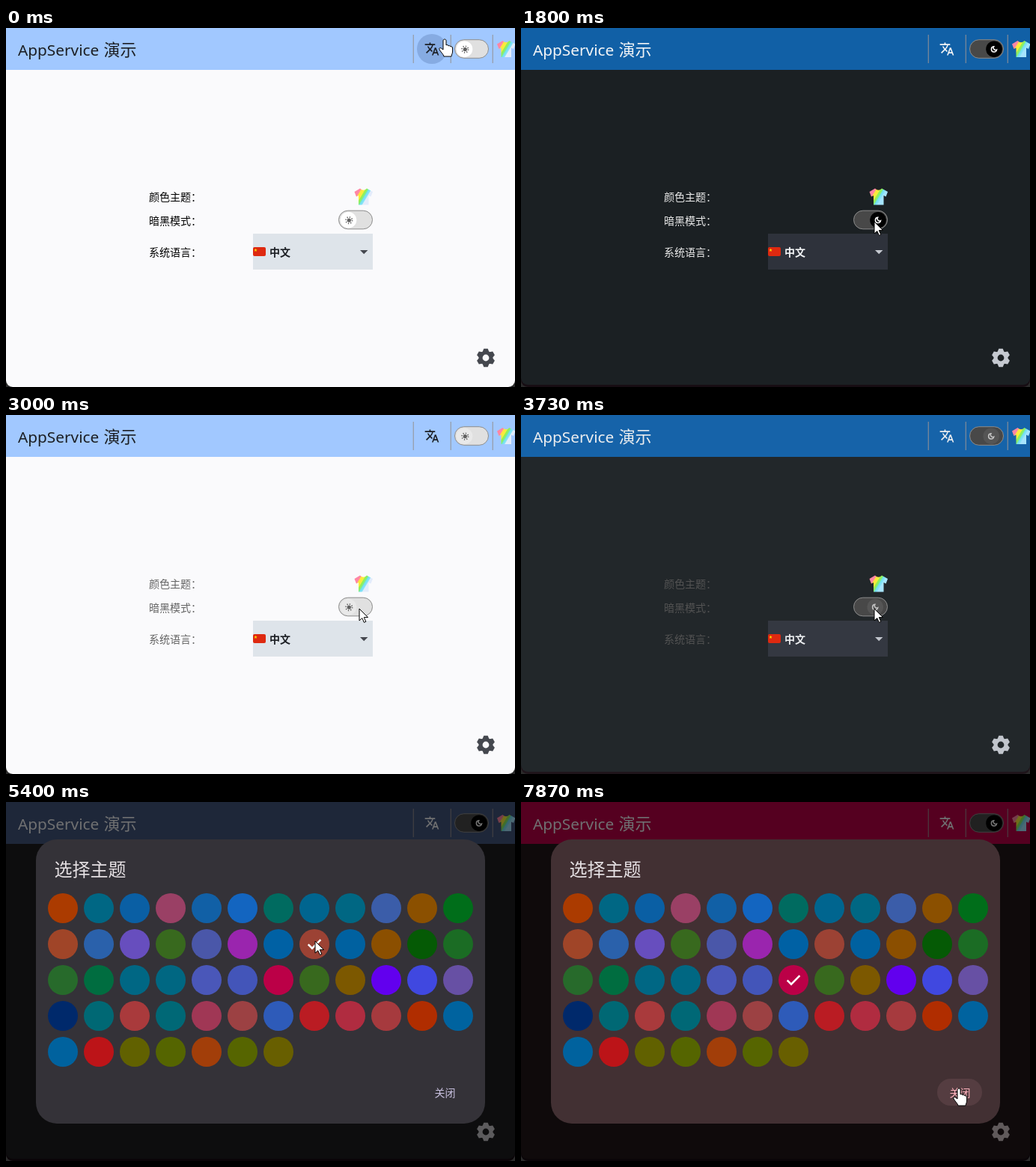
Recreate the animation shown at these times as an HTML page. Size 680 by 480 pixels, loop 8 s.

```html
<!DOCTYPE html>
<html lang="zh-CN">
<head>
<meta charset="utf-8">
<title>主题切换</title>
<style>
html, body { margin: 0; width: 100%; height: 100%; overflow: hidden; background: #2b2b2b; }
svg { display: block; }
text { font-family: "Noto Sans CJK SC", "Noto Sans CJK", sans-serif; }
#stage, #stage * { animation-duration: 8s; animation-iteration-count: infinite; animation-timing-function: linear; animation-play-state: paused; }
#stage { animation-name: theme, lag, slide, knob, mode, pointer; animation-timing-function: linear, linear, linear, linear, step-end, step-end; }

.page { fill: var(--page); }
.edge { fill: var(--edge); }
.bar { fill: var(--bar); }
.field { fill: var(--field); }
.ink { fill: var(--ink); }
.icon { fill: var(--icon); }
.line { stroke: var(--line); stroke-width: 1.4; }
.title { font-size: 22px; }
.title.latin { font: 20.8px "Noto Sans", "Open Sans", sans-serif; }
.label { font-size: 14px; fill: color-mix(in srgb, #ebebeb calc(var(--lag) * 100%), #000); }
.colon { font-family: "Noto Sans CJK JP", "Noto Sans CJK", sans-serif; }
.value { font-size: 14px; font-weight: 700; }

.track { fill: color-mix(in srgb, #484848 calc(var(--night) * 100%), #e0e0e0); stroke: #8c8c8c; }
.thumb { transform: translate(calc(13px + var(--slide) * 19.5px), 12.5px); }
.thumb > circle { fill: var(--knob); }
.sun { opacity: calc(1 - var(--night)); fill: #606060; }
.rays { fill: none; stroke: #606060; stroke-width: 1.8; stroke-dasharray: 1.2 2.1; }
.moon { opacity: var(--night); fill: none; stroke: color-mix(in srgb, #fff calc(var(--lag) * 100%), #a6a6a6); stroke-width: 1.5; }

#hover { animation-name: hover; fill: rgba(50, 80, 130, .23); }
#modal { animation-name: open; }
.dialog { fill: var(--dialog); }
.heading { font-size: 24px; fill: #e6e1e4; }
.close { font-size: 14px; font-weight: 500; fill: var(--accent); }
#pill { animation-name: pill; fill: var(--accent); }
#check { animation-name: check; animation-timing-function: step-end !important; fill: none; stroke: #fff; stroke-width: 2.5; }
#cursor { animation-name: move; fill: #fff; stroke: #000; stroke-linejoin: round; }
.hand { opacity: var(--hand); }
.arrow { opacity: calc(1 - var(--hand)); }

@keyframes theme {
  0%, 16.42%, 36.69%, 44.25% {
    --page: #fafafc; --edge: #fafafc; --bar: #a1c8ff; --field: #dee4ea; --ink: #1c1f24; --icon: #45484f;
    --line: #98a1b1; --sky: #e3ecfb; --dialog: #dee4ea; --accent: #1160a6;
  }
  18.92%, 34.19%, 46.75%, 66.6% {
    --page: #1b2023; --edge: #170d13; --bar: #1160a6; --field: #2e323b; --ink: #f2f4f6; --icon: #c5c9d0;
    --line: #71849a; --sky: #a5e4ff; --dialog: #2e323b; --accent: #a9c7ff;
  }
  69.1%, 82.45% {
    --page: #201a18; --edge: #170d13; --bar: #9c4234; --field: #3e3132; --ink: #f2f4f6; --icon: #d0c4c0;
    --line: #a5837b; --sky: #a5e4ff; --dialog: #3e3132; --accent: #ffb4a6;
  }
  84.95%, 100% {
    --page: #21171a; --edge: #170d13; --bar: #ba0047; --field: #423033; --ink: #f2f4f6; --icon: #d2c4c6;
    --line: #a76d80; --sky: #a5e4ff; --dialog: #423033; --accent: #ffb2bd;
  }
}
/* Labels ease after the moving theme, then finish on their own. */
@keyframes lag {
  0%, 16.42%, 39.19%, 44.25% { --lag: 0; }
  17.67%, 45.5% { --lag: .11; }
  18.92%, 46.75% { --lag: .37; }
  21.42%, 34.19%, 49.25%, 100% { --lag: 1; }
  35.44% { --lag: .89; }
  36.69% { --lag: .63; }
}
@keyframes slide {
  0%, 16.42%, 37.19%, 44.25% { --slide: 0; }
  19.42%, 34.19%, 47.25%, 100% { --slide: 1; }
}
@keyframes knob {
  0%, 16.42%, 37.82%, 44.25% { --knob: #fff; }
  20.05%, 34.19%, 47.88%, 100% { --knob: #000; }
}
@keyframes mode {
  0%, 34.9% { --night: 0; }
  16.5%, 44.1%, 100% { --night: 1; }
}
@keyframes pointer {
  0%, 12.4%, 53%, 90.6%, 100% { --hand: 1; }
  5%, 13.3%, 56.7% { --hand: 0; }
}
@keyframes hover { 0%, 1.7% { opacity: 1; } 3.3%, 100% { opacity: 0; } }
@keyframes open {
  0%, 54.6% { opacity: 0; animation-timing-function: ease-out; }
  56.6%, 100% { opacity: 1; }
}
@keyframes pill { 0%, 90.6% { opacity: 0; } 91.6%, 100% { opacity: .1; } }
@keyframes check {
  0% { transform: translate(268px, 142px); }
  66.6% { transform: translate(412px, 190px); }
  82.45%, 100% { transform: translate(364px, 238px); }
}
@keyframes move {
  0%, 1.6% { transform: translate(586px, 15px); }
  4.2% { transform: translate(622px, 26px); }
  7.5% { transform: translate(576px, 142px); }
  11.6%, 12.4% { transform: translate(472px, 253px); }
  12.5% { transform: translate(479px, 279px); }
  14.1%, 49.5% { transform: translate(472px, 259px); }
  54.1%, 56.6% { transform: translate(477px, 225px); }
  63.3%, 71.6% { transform: translate(413px, 186px); }
  76.6% { transform: translate(363px, 224px); }
  77.5%, 87% { transform: translate(366px, 228px); }
  91.6%, 98.2% { transform: translate(602px, 384px); }
  98.3%, 100% { transform: translate(585px, 383px); }
}
</style>
</head>
<body>
<svg id="stage" width="680" height="480" viewBox="0 0 680 480">
  <defs>
    <linearGradient id="rainbow" gradientUnits="userSpaceOnUse" x1="3" y1="5" x2="23" y2="17">
      <stop offset=".13" stop-color="#ff86a4"/><stop offset=".18" stop-color="#ffe53d"/>
      <stop offset=".34" stop-color="#f4ee3c"/><stop offset=".38" stop-color="#95f04f"/>
      <stop offset=".48" stop-color="#86ee78"/><stop offset=".53" stop-color="#6fdff0"/>
      <stop offset=".64" stop-color="#8be4f8"/><stop offset=".68" style="stop-color: var(--sky)"/>
    </linearGradient>
    <path id="shirt" fill="url(#rainbow)" d="M8 0 .5 4.5 3 11 6 9.5V22H19.5V9.5L22.5 11 25 4.5 17 0Q12.7 4.5 8 0Z"/>
    <path id="tooth" d="M-4.4-8 -2.7-12.2H2.7L4.4-8Z"/>
    <g id="switch">
      <rect class="track" width="45" height="24.6" rx="12.3"/>
      <g class="thumb">
        <circle r="10.8"/>
        <g class="sun" transform="translate(.8 .4)"><circle r="2.6"/><circle class="rays" r="4.2"/></g>
        <path class="moon" d="M-.4-3.4A3.6 3.6 0 1 0 3.5.9 3 3 0 0 1-.4-3.4Z"/>
      </g>
    </g>
  </defs>

  <rect class="edge" y="-20" width="680" height="500" rx="9"/>
  <rect class="page" y="-20" width="680" height="497" rx="9"/>
  <rect class="bar" width="680" height="56"/>
  <text class="title latin ink" x="16" y="37">AppService</text>
  <text class="title ink" x="130.5" y="37">演示</text>
  <path class="line" d="M544.3 9V47M594.3 9V47M650.3 9V47"/>
  <circle id="hover" cx="569" cy="28" r="20"/>
  <path class="ink" transform="translate(558.8 17.8) scale(.85)" d="M12.87 15.07l-2.54-2.51.03-.03c1.74-1.94 2.98-4.17 3.71-6.53H17V4h-7V2H8v2H1v1.99h11.17C11.5 7.92 10.44 9.75 9 11.35 8.07 10.32 7.3 9.19 6.69 8h-2c.73 1.63 1.73 3.17 2.98 4.56l-5.09 5.02L4 19l5-5 3.11 3.11.76-2.04zM18.5 10h-2L12 22h2l1.12-3h4.75L21 22h2l-4.5-12zm-2.62 7l1.62-4.33L19.12 17h-3.24z"/>
  <use href="#switch" x="599.5" y="15.7"/>
  <use href="#shirt" x="655.5" y="17"/>

  <text class="label" x="191" y="231">颜色主题<tspan class="colon">：</tspan></text>
  <text class="label" x="191" y="262.5">暗黑模式<tspan class="colon">：</tspan></text>
  <text class="label" x="191" y="304.5">系统语言<tspan class="colon">：</tspan></text>
  <use href="#shirt" x="465" y="214.5"/>
  <use href="#switch" x="444.5" y="244.2"/>
  <rect class="field" x="330" y="275" width="160" height="48"/>
  <rect x="330" y="293" width="17" height="12" rx="2" fill="#de2910"/>
  <path d="M333.5 294.8l.6 1.5h1.5l-1.2 1 .5 1.6-1.4-1-1.4 1 .5-1.6-1.2-1h1.5Z" fill="#ffde00"/>
  <text class="value ink" x="352" y="304.5">中文</text>
  <path class="icon" d="M473 297H483.4L478.2 302.2Z"/>
  <g class="icon" transform="translate(641 441)">
    <circle r="6.9" fill="none" style="stroke: var(--icon)" stroke-width="5"/>
    <use href="#tooth"/><use href="#tooth" transform="rotate(60)"/><use href="#tooth" transform="rotate(120)"/>
    <use href="#tooth" transform="rotate(180)"/><use href="#tooth" transform="rotate(240)"/><use href="#tooth" transform="rotate(300)"/>
  </g>

  <g id="modal">
    <rect y="-20" width="680" height="500" rx="9" fill-opacity=".54"/>
    <rect class="dialog" x="40" y="50" width="600" height="380" rx="28"/>
    <text class="heading" x="64.5" y="99">选择主题</text>
    <g id="swatches"></g>
    <path id="check" d="M-8.3.4-3 5.7 8.4-5.8"/>
    <rect id="pill" x="556" y="370" width="60" height="36" rx="18"/>
    <text class="close" x="572.5" y="394">关闭</text>
  </g>

  <g id="cursor">
    <path class="arrow" d="M0 0V16L3.8 12.6 6.4 18.4 8.8 17.3 6.3 11.6H11.5Z"/>
    <path class="hand" d="M-2 2C-2-.6 2-.6 2 2V8c1-1 3-.5 3 1 1-.8 2.7-.4 3 1 1.2-.6 2.6 0 2.6 2V16c0 3-1.2 4-1.6 7H-1c-.5-3-5-6.5-6-9.5-.7-2 1.5-2.5 3-1L-2 14Z"/>
  </g>
</svg>
<script>
const LOOP = 8000, TICK = 1000 / 15;

const register = (syntax, initialValue, names) => names.split(' ').forEach(name =>
  CSS.registerProperty({ name: '--' + name, syntax, initialValue, inherits: true }));
register('<color>', 'white', 'page edge bar field ink icon line sky dialog accent knob');
register('<number>', '0', 'lag slide night hand');

const palette = `
  ab3b00 006784 0a5fa4 9a4065 1160a6 1365c0 006b60 00658f 006783 3b5da9 8b5000 006e1a
  a04528 2a61ab 674ebe 38691e 4a57a9 9a25ae 0061a4 9c4234 0061a0 8b4f00 055a05 1b6c24
  276a2b 006d40 006784 006782 4a57b9 4355b9 bb0047 38691e 7c5800 6200ee 4048e0 6750a4
  00296b 006874 a93a3c 006876 a03755 9c4143 2e5bb9 ba1c23 b02c40 a63a3e b02d00 00639f
  00629e bc1418 616100 556500 a23e09 566500 685f00`.trim().split(/\s+/);
document.getElementById('swatches').innerHTML = palette.map((color, i) =>
  `<circle cx="${76 + 48 * (i % 12)}" cy="${142 + 48 * Math.floor(i / 12)}" r="20" fill="#${color}"/>`).join('');

const animations = document.getAnimations();
const start = performance.now();
function render() {
  const time = (performance.now() - start) % LOOP;
  const snapped = Math.floor((time + 4) / TICK) * TICK % LOOP;
  for (const animation of animations) animation.currentTime = snapped;
  requestAnimationFrame(render);
}
render();
</script>
</body>
</html>
```
